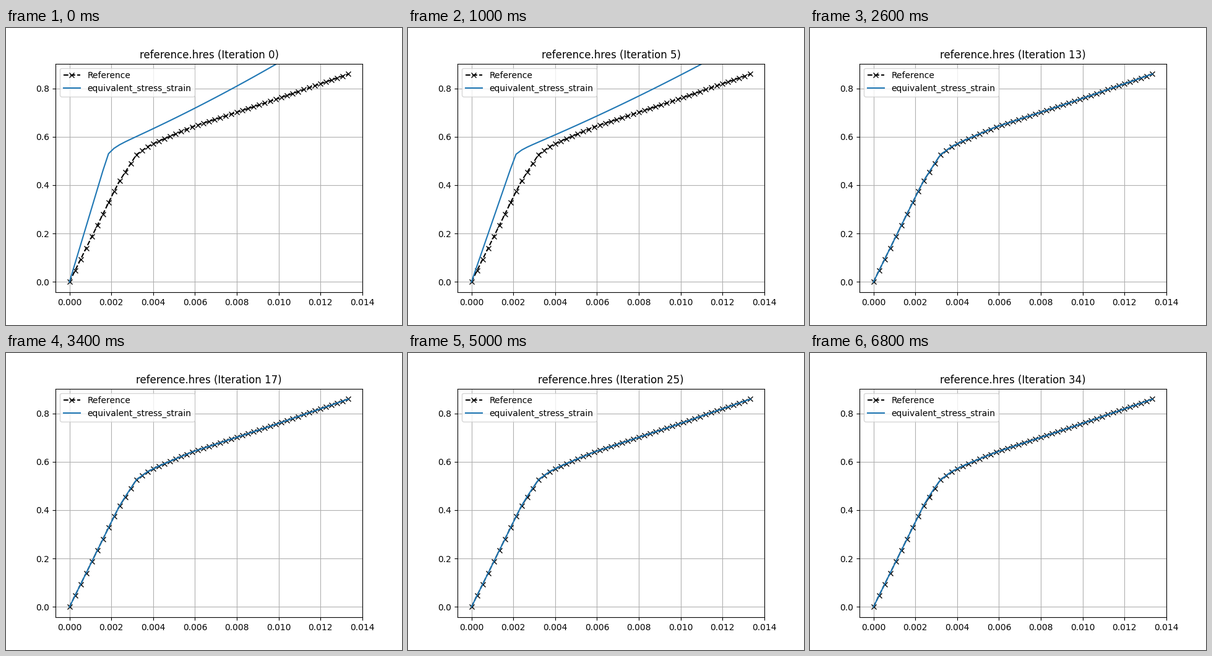
A matplotlib script that plays this animation: 640x480 px, repeating every 7 s.

```python
import numpy as np
import matplotlib.pyplot as plt
from matplotlib.animation import FuncAnimation

FRAMES, INTERVAL = 35, 200
STRAIN_MAX, STRESS_MAX = 0.04 / 3, 0.8592
step = np.arange(51)
strain = step * STRAIN_MAX / 50

# measured curve: elastic rise, knee, then nearly linear hardening
knots = [(0, 0), (8, .374), (9, .418), (12, .526), (14, .559), (16, .582),
         (22, .641), (36, .747), (50, STRESS_MAX)]
reference = np.interp(step, *zip(*knots))

# elastic slope, yield step, hardening, its growth, knee height, knee width
STIFF = np.array([.0767, 6.85, .01007, .000053, .0224, 1.0])
SOFTER = np.array([.0667, 7.87, .00953, .000040, .0130, 0.9])
NEAR = np.array([.0437, 10.0, .00780, .000012, .1170, 2.7])
FINAL = np.array([.0466, 8.50, .00730, .000010, .1420, 2.8])


def material(params):
    """Elastic line up to yield, then a rounded knee and hardening."""
    slope, start, hard, growth, knee, width = params
    t = np.maximum(step - start, 0)
    plastic = hard * t + growth * t**2 + knee * (1 - np.exp(-t / width))
    return slope * np.minimum(step, start) + plastic


def blend(a, b, t):
    return a + (b - a) * t


def simulated(i):
    """Stress of the model at iteration i."""
    if i <= 5:
        return material(blend(STIFF, SOFTER, i / 5))
    if i == 6:  # overshoot before the fit settles
        return material(STIFF) * 1.12
    if i <= 9:
        return material(blend(SOFTER, NEAR, (i - 6) / 3))
    fitted = blend(reference, material(FINAL), .4 * (i - 9) / (FRAMES - 10))
    return blend(fitted, material(NEAR), .3 ** (i - 9))


fig, ax = plt.subplots(figsize=(6.4, 4.8), dpi=100)
ax.plot(strain, reference, "k--x", label="Reference")
model, = ax.plot(strain, simulated(0), color="C0",
                 label="equivalent_stress_strain")
ax.set_xlim(-.05 * STRAIN_MAX, 1.05 * STRAIN_MAX)
ax.set_ylim(-.05 * STRESS_MAX, 1.05 * STRESS_MAX)
ax.grid(True)
ax.legend(loc="best")
title = ax.set_title("")


def update(i):
    model.set_ydata(simulated(i))
    title.set_text(f"reference.hres (Iteration {i})")
    return model, title


anim = FuncAnimation(fig, update, frames=FRAMES, interval=INTERVAL,
                     repeat=True, repeat_delay=0)
plt.show()
```
